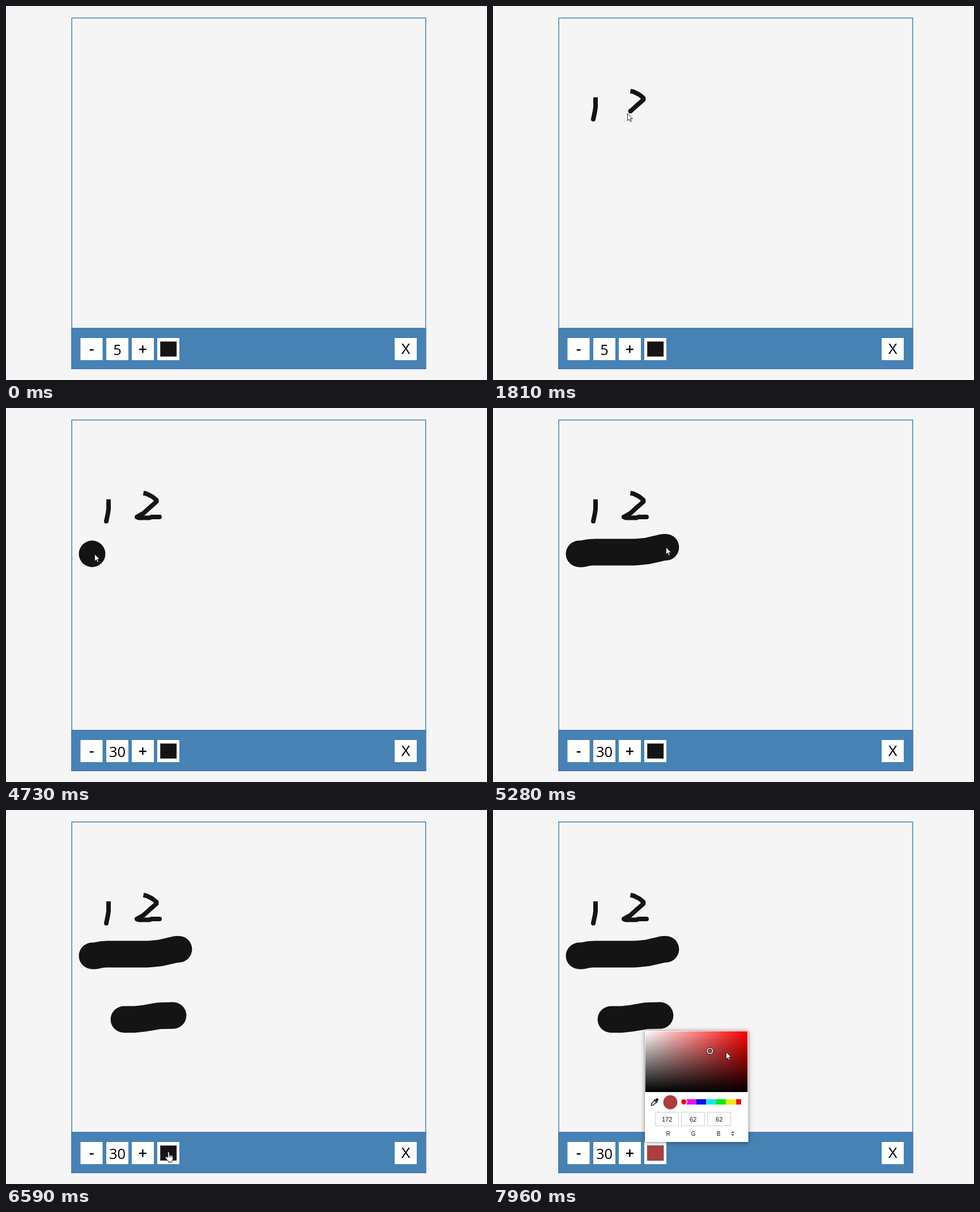
Animation of 849 by 659 pixels, one loop 8 s. Source, as an HTML page:

```html
<!DOCTYPE html>
<html lang="en">
<head>
<meta charset="utf-8">
<title>Drawing board</title>
<style>
  html, body { margin: 0; width: 100%; height: 100%; overflow: hidden; background: #f5f5f5; }
  svg { display: block; }
  text { text-anchor: middle; }
  .btn { font: 25px "Liberation Sans", Arial, sans-serif; }
  .sign { stroke: #000; stroke-width: .6; }
  .size { font: 25.5px "Open Sans", "Noto Sans", sans-serif; }
  .field { font: 11px "Liberation Sans", Arial, sans-serif; fill: #111; }
  .label { font: 10px "Liberation Sans", Arial, sans-serif; fill: #111; }
  .ink path { fill: none; stroke-linejoin: round; }
  .thin { stroke: #141414; stroke-width: 8; }
  .thick { stroke: #141414; stroke-width: 46.8; stroke-linecap: round; }
  .panel { fill: #fff; filter: drop-shadow(0 0 1px rgba(0, 0, 0, .4)) drop-shadow(0 1px 4px rgba(0, 0, 0, .35)); }
  .input { fill: #fff; stroke: #cfcfcf; }
  .cursor { fill: #fff; stroke: #111; stroke-width: .9; stroke-linejoin: round; }
</style>
</head>
<body>
<svg width="849" height="659" viewBox="0 0 849 659">
  <defs>
    <linearGradient id="tint"><stop stop-color="#fff"/><stop offset="1" stop-color="#f00"/></linearGradient>
    <linearGradient id="shade" x2="0" y2="1"><stop stop-opacity="0"/><stop offset="1"/></linearGradient>
  </defs>

  <rect x="116.1" y="21.1" width="624.6" height="618" fill="none" stroke="#4682b4" stroke-width="1.5"/>
  <g class="ink" id="ink"></g>

  <rect x="115.4" y="567.3" width="626" height="72.7" fill="#4682b4"/>
  <path d="M116 639.4V568H740.8V639.4Z" fill="none" stroke="#4b75b8" stroke-width="1.3"/>
  <g fill="#fff">
    <rect x="131.5" y="585" width="39" height="39"/>
    <rect x="177" y="585" width="39" height="39"/>
    <rect x="222" y="585" width="39" height="39"/>
    <rect x="267" y="585" width="39" height="39"/>
    <rect x="686" y="585" width="39" height="39"/>
  </g>
  <text class="btn sign" x="151.2" y="612.6">-</text>
  <text class="size" id="size" x="196.5" y="614.5">5</text>
  <text class="btn sign" x="241.3" y="612.6">+</text>
  <text class="btn" x="705.7" y="613">X</text>
  <rect class="paint" x="272.3" y="591.3" width="28.7" height="26.2" stroke="#555" stroke-width=".8"/>

  <g id="picker">
    <rect class="panel" x="268" y="389" width="182.7" height="196"/>
    <svg x="268.5" y="389.7" width="181" height="107.3">
      <rect width="181" height="107.3" fill="url(#tint)"/>
      <rect width="181" height="107.3" fill="url(#shade)"/>
      <g id="ring">
        <circle r="6.4" fill="#111"/>
        <circle r="5.5" fill="#fff"/>
        <circle r="3.9" fill="#222"/>
        <circle class="paint" r="3"/>
      </g>
    </svg>
    <g transform="translate(285 515) rotate(45)">
      <path d="M-2-2.5V5L0 8 2 5V-2.5" fill="none" stroke="#111" stroke-width="1.4"/>
      <path d="M-4-3.8H4V-2H-4ZM-2.3-4V-6.5a2.3 2.3 0 0 1 4.6 0V-4Z" fill="#111"/>
    </g>
    <circle class="paint" cx="313" cy="515" r="12.5"/>
    <g id="hue"></g>
    <circle cx="336.8" cy="514.3" r="5.4" fill="#e80c0c" stroke="#fff" stroke-width="1.6"/>
    <g id="fields"></g>
    <path d="M421.2 568.9 423 567.2 424.8 568.9M421.2 571.4 423 573.1 424.8 571.4" fill="none" stroke="#111" stroke-width="1.2"/>
  </g>

  <g class="cursor" id="cursor">
    <path id="arrow" d="M.5.4V13L3.4 10.3 5.4 14.8 7.4 13.9 5.5 9.6H9.3Z"/>
    <g id="hand">
      <path d="M-1.4 10V1.8a1.3 1.3 0 0 1 2.6 0V6.8a1.2 1.2 0 0 1 2.3.2 1.2 1.2 0 0 1 2.2.7 1.1 1.1 0 0 1 2 .9V12.5Q7.6 14.4 6 16.2V18.5H-.5V16.8Q-3 14.6-5.6 10.8a1.2 1.2 0 0 1 2-1.4Z"/>
      <path d="M1.2 6.8V10M3.5 7.2V10M5.7 8V10.3" fill="none"/>
    </g>
  </g>
</svg>

<script>
const TICK = 68.6, LOOP = 8000;
const PICKER_OPEN = 100, COLOUR_SET = 110;
const CLICKS = [44, 47, 51, 54, 58];
const LEAD = .4; // ticks the pointer runs ahead of the ink

const $ = id => document.getElementById(id);
const svg = (tag, attrs, parent) => {
  const el = document.createElementNS('http://www.w3.org/2000/svg', tag);
  for (const k in attrs) el.setAttribute(k, attrs[k]);
  return parent.appendChild(el);
};
const show = (el, on) => el.style.display = on ? '' : 'none';
const ease = p => (p = Math.min(1, Math.max(0, p))) * p * (3 - 2 * p);

// Each act continues from where the last one ended: start tick, end tick, points, pen
let at = '767 638';
const acts = [
  [3, 7, '281 280'],
  [8, 12.5, '181 161'],
  [14, 16, '181 178 180 185 177 199.5', 'thin'],
  [17, 22, '242.5 150'],
  [22.8, 27.2, '248 151 258 156 265.5 162 265.5 165 242.5 185.5 231 192', 'thin'],
  [30, 33, '234 193.5 253 193.5 257 192 271 192', 'thin'],
  [34, 41, '239 595.5'],
  [58, 67, '152 257'],
  [69, 73, '157 257 169 254.6 178 254 250 254 272 252 301 245.4 305 245.4', 'thick'],
  [77, 82, '208 369'],
  [82, 86.2, '227 369 245 367 270 362.6 295 362', 'thick'],
  [90, 97, '287 616'],
  [101, 109, '384 424'],
  [112, 116, '411 426']
].map(([start, end, points, pen]) => {
  const path = svg('path', { class: pen || '', d: `M${at} L${points}` }, $('ink'));
  const nib = svg('circle', { r: pen === 'thin' ? 4 : 0, fill: '#141414' }, $('ink'));
  at = points.split(' ').slice(-2).join(' ');
  const size = path.getTotalLength();
  const reach = n => size * ease((n - start) / (end - start));
  return { start, pen, path, nib, reach };
});

const BAND = 106 / 6;
for (let i = 0; i <= 6; i++) {
  const left = Math.max(0, (i - .5) * BAND), right = Math.min(106, (i + .5) * BAND);
  svg('rect', { x: 332 + left, y: 509.5, width: right - left, height: 9.5,
    fill: `hsl(${360 - 60 * i} 88% 49%)` }, $('hue'));
}

const fields = ['R', 'G', 'B'].map((name, i) => {
  const x = 287 + i * 46;
  svg('rect', { class: 'input', x: x - .5, y: 532.5, width: 41, height: 24 }, $('fields'));
  svg('text', { class: 'label', x: 309 + i * 44.6, y: 573.5 }, $('fields')).textContent = name;
  return svg('text', { class: 'field', x: x + 20.2, y: 549 }, $('fields'));
});

function drawInk(n) {
  for (const { start, pen, path, nib, reach } of acts) {
    if (!pen) continue;
    const length = reach(n), tip = path.getPointAtLength(length);
    show(path, n >= start);
    show(nib, length > 0);
    path.setAttribute('stroke-dasharray', `${length} 9999`);
    nib.setAttribute('cx', tip.x);
    nib.setAttribute('cy', tip.y);
  }
}

function movePointer(n) {
  const act = acts.filter(a => a.start <= n).pop();
  show($('cursor'), act);
  if (!act) return;
  const { x, y } = act.path.getPointAtLength(act.reach(act.pen ? n + LEAD : n));
  const overButton = y >= 585 && y <= 624 && x >= 222 && x <= 306;
  show($('hand'), overButton);
  show($('arrow'), !overButton);
  $('cursor').setAttribute('transform', `translate(${Math.round(x)} ${Math.round(y)})`);
}

function render(n) {
  drawInk(n);
  movePointer(n);
  $('size').textContent = 5 + 5 * CLICKS.filter(c => c <= n).length;

  const picked = n >= COLOUR_SET;
  const rgb = picked ? [172, 62, 62] : [20, 20, 20];
  document.querySelectorAll('.paint').forEach(el => el.setAttribute('fill', `rgb(${rgb})`));
  fields.forEach((el, i) => el.textContent = rgb[i]);
  $('ring').setAttribute('transform', picked ? 'translate(114.5 34.8)' : 'translate(0 97.3)');
  show($('picker'), n >= PICKER_OPEN);
}

let last = -1;
function loop() {
  const n = Math.floor(performance.now() % LOOP / TICK + .1);
  if (n !== last) render(last = n);
  requestAnimationFrame(loop);
}
loop();
</script>
</body>
</html>
```
